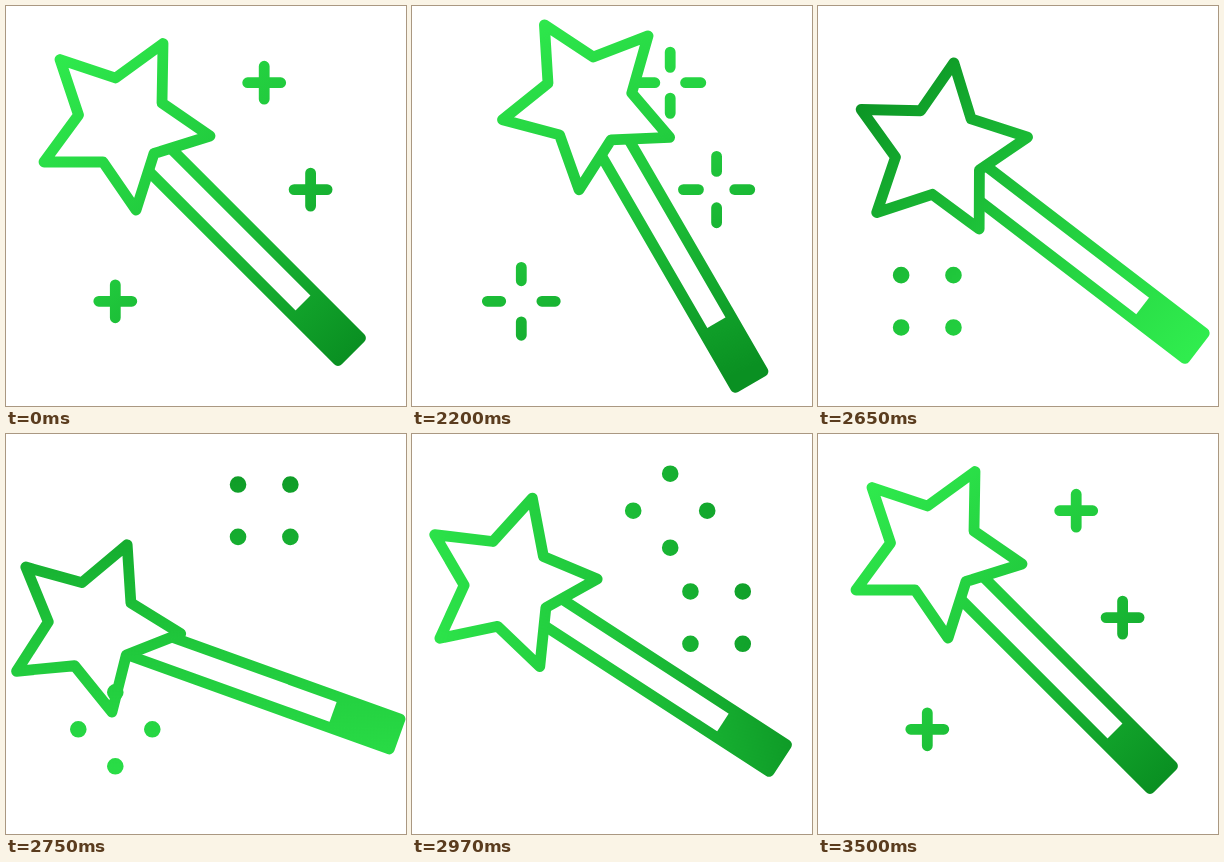
Recreate the animation shown at these times as an HTML page. Size 400 by 400 pixels, loop 3.52 s.

```html
<!DOCTYPE html>
<html lang="en">
<head>
<meta charset="utf-8">
<title>Magic wand</title>
<style>
  html, body { margin: 0; width: 100%; height: 100%; overflow: hidden; background: #fff; }
  svg { display: block; width: 100vw; height: 100vh; }

  .line { fill: none; stroke: #fff; stroke-width: 10.8; stroke-linecap: round; stroke-linejoin: round; }
  .wand, .star, .shade, .arms, .dots, .ray {
    animation: 3520ms cubic-bezier(.37, 0, .63, 1) infinite;
  }
  .wand { transform-origin: 229.7px 229.7px; animation-name: swing; }
  .star { transform-origin: 116.3px 116.3px; animation-name: spin; }
  .shade { transform-origin: 200px 200px; animation-name: turn; }
  .ray { animation-name: burst; animation-delay: var(--lag, 0ms); }
  .arms { animation-name: hide; animation-timing-function: step-end; }
  .arms.late { animation-name: hide-late; }
  .dots {
    opacity: 0;
    stroke-width: 16.6;
    animation-name: blink;
    animation-timing-function: step-end;
    animation-delay: var(--wait, 0ms);
  }

  @keyframes swing {
    0%, 56.82% { transform: translate(0, 0) rotate(0deg); }
    65.77%, 70.6% { transform: translate(38px, 6.5px) rotate(21deg); }
    78.92% { transform: translate(7.2px, 16.2px) rotate(-26.2deg); }
    89.91% { transform: translate(-4.5px, -2.2px) rotate(2.2deg); }
    99.3%, 100% { transform: translate(0, 0) rotate(0deg); }
  }
  @keyframes spin {
    0%, 70.94% { transform: rotate(0deg); }
    84.66%, 100% { transform: rotate(-360deg); }
  }
  @keyframes turn {
    0%, 56.82% { transform: rotate(0deg); }
    93.75%, 100% { transform: rotate(360deg); }
  }
  @keyframes burst {
    0% { d: path("M0 0H16.5M0 0H-16.5M0 0V16.5M0 0V-16.5"); }
    56.82% {
      d: path("M0 0H16.5M0 0H-16.5M0 0V16.5M0 0V-16.5");
      animation-timing-function: linear;
    }
    62.5% {
      d: path("M18.5 0H33.5M-18.5 0H-33.5M0 18.5V33.5M0 -18.5V-33.5");
      animation-timing-function: cubic-bezier(.2, .5, .5, 1);
    }
    70.6% { d: path("M34 0H37M-34 0H-37M0 34V37M0 -34V-37"); }
    72.73% {
      d: path("M37 0H37M-37 0H-37M0 37V37M0 -37V-37");
      animation-timing-function: step-end;
    }
    90.91% { d: path("M0 0H0M0 0H0M0 0V0M0 0V0"); }
    98.3%, 100% { d: path("M0 0H16.5M0 0H-16.5M0 0V16.5M0 0V-16.5"); }
  }
  @keyframes hide {
    0% { opacity: 1; }
    71.02% { opacity: 0; }
    92%, 100% { opacity: 1; }
  }
  @keyframes hide-late {
    0% { opacity: 1; }
    72.7% { opacity: 0; }
    92%, 100% { opacity: 1; }
  }
  @keyframes blink {
    0% { opacity: 0; transform: rotate(45deg); }
    71.02% { opacity: 1; transform: rotate(45deg); }
    76.14% { opacity: 1; transform: rotate(0deg); }
    80.68%, 100% { opacity: 0; transform: rotate(0deg); }
  }
</style>
</head>
<body>
<svg viewBox="0 0 400 400">
  <defs>
    <linearGradient id="green" gradientUnits="userSpaceOnUse" x1="40" y1="40" x2="345" y2="345">
      <stop offset="0" stop-color="#30ec4e"/>
      <stop offset=".5" stop-color="#20c83c"/>
      <stop offset="1" stop-color="#0a9022"/>
    </linearGradient>
    <mask id="shapes" maskUnits="userSpaceOnUse" x="0" y="0" width="400" height="400">
      <g class="wand">
        <path class="line" d="M146 123.5L354.5 332L332 354.5L123.5 146"/>
        <path fill="#fff" d="M308.2 285.8L354.5 332L332 354.5L285.8 308.2Z"/>
        <!-- the black star fill hides the rod behind it -->
        <path class="line star" style="fill:#000"
          d="M54 53.5L109.5 72L157 37.5L156 97L204 130L148 147.5L130 204L97 156L38 156L72.5 109Z"/>
      </g>
      <g transform="translate(258.2 76.7)" style="--lag:35ms;--wait:200ms">
        <g class="arms late"><path class="line ray" d="M0 0H16.5M0 0H-16.5M0 0V16.5M0 0V-16.5"/></g>
        <path class="line dots" d="M37 0h0M-37 0h0M0 37v0M0 -37v0"/>
      </g>
      <g transform="translate(304.6 183.6)" style="--lag:5ms;--wait:400ms">
        <g class="arms"><path class="line ray" d="M0 0H16.5M0 0H-16.5M0 0V16.5M0 0V-16.5"/></g>
        <path class="line dots" d="M37 0h0M-37 0h0M0 37v0M0 -37v0"/>
      </g>
      <g transform="translate(109.3 295.3)" style="--lag:-15ms;--wait:0ms">
        <g class="arms"><path class="line ray" d="M0 0H16.5M0 0H-16.5M0 0V16.5M0 0V-16.5"/></g>
        <path class="line dots" d="M37 0h0M-37 0h0M0 37v0M0 -37v0"/>
      </g>
    </mask>
  </defs>
  <g mask="url(#shapes)">
    <rect class="shade" x="-100" y="-100" width="600" height="600" fill="url(#green)"/>
  </g>
</svg>
</body>
</html>
```
